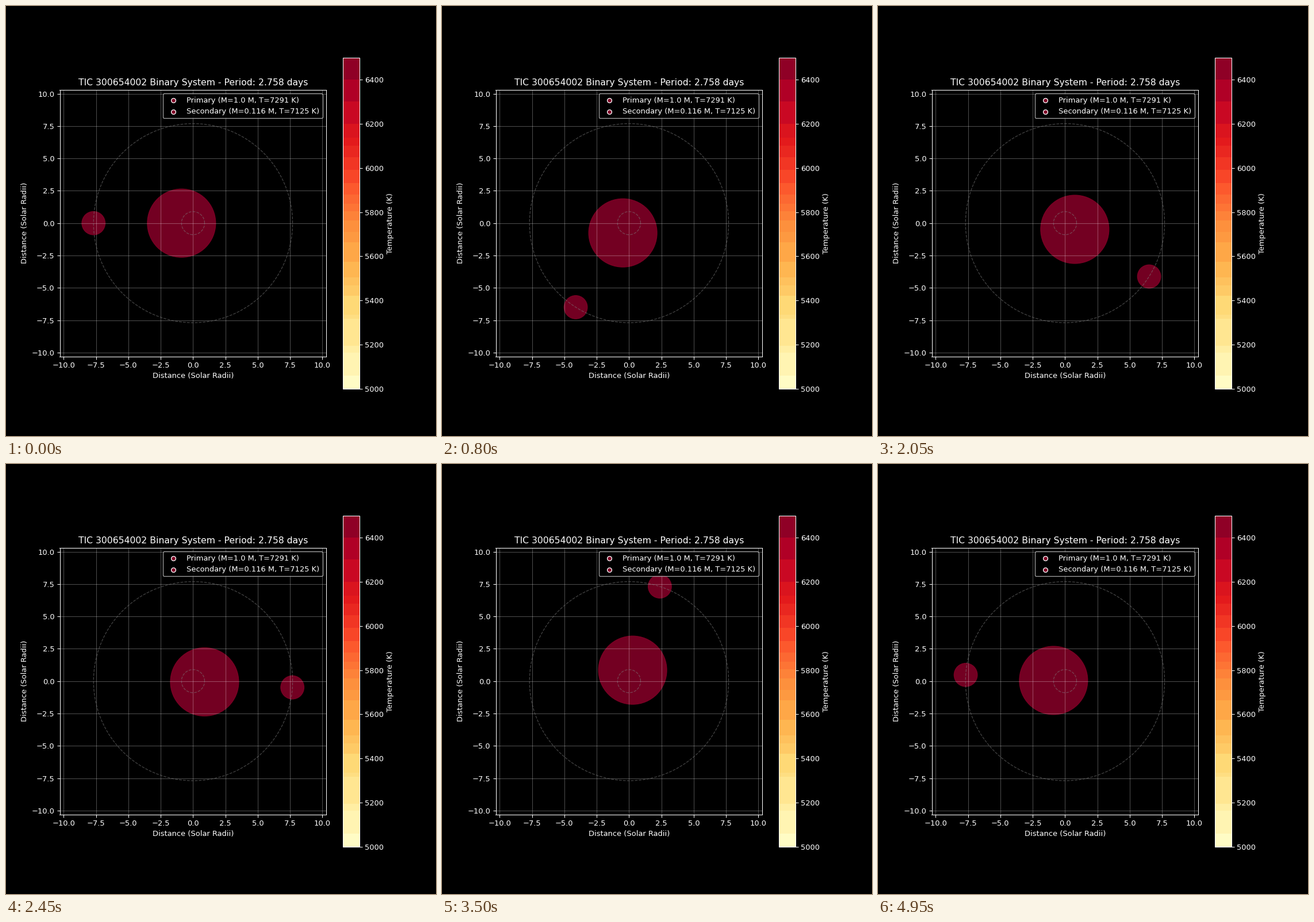
Animation, 748 px wide and 748 px high, one loop 5000 ms. Source, as a matplotlib script:

```python
import numpy as np
import matplotlib.pyplot as plt
from matplotlib.animation import FuncAnimation
from matplotlib.cm import ScalarMappable
from matplotlib.colors import ListedColormap, Normalize
from matplotlib.patches import Circle

plt.style.use("dark_background")
plt.rcParams["font.family"] = "DejaVu Sans"

FRAMES = 100
PERIOD = 2.758                # days
M1, M2 = 1.0, 0.116           # solar masses
R1, R2 = 2.64, 0.9            # solar radii
T1, T2 = 7291, 7125           # kelvin

# Kepler's third law, converted from AU to solar radii
sep = ((M1 + M2) * (PERIOD / 365.25) ** 2) ** (1 / 3) * 215.03
A1 = sep * M2 / (M1 + M2)
A2 = sep * M1 / (M1 + M2)

# Stepped temperature scale: each band takes the colour at its middle
ylorrd = plt.get_cmap("YlOrRd")
edges = [0, 10, 28, 33, 54, 57, 72, 80, 86, 98, 113, 121, 130, 137, 143,
         150, 159, 169, 179, 188, 194, 205, 222, 239, 256]
bands = [ylorrd((lo + hi) // 2)
         for lo, hi in zip(edges, edges[1:]) for _ in range(lo, hi)]
scale = ScalarMappable(Normalize(5000, 6500), ListedColormap(bands))
star_color = ylorrd(1.0)

fig, ax = plt.subplots(figsize=(8, 8), dpi=93.5)
lim = 1.2 * sep
ax.set_xlim(-lim, lim)
ax.set_ylim(-lim, lim)
ax.set_aspect("equal")
ax.grid(True, color="white", alpha=0.3)
ax.set_xlabel("Distance (Solar Radii)")
ax.set_ylabel("Distance (Solar Radii)")
ax.set_title(f"TIC 300654002 Binary System - Period: {PERIOD} days")
fig.colorbar(scale, ax=ax, label="Temperature (K)")

theta = np.linspace(0, 2 * np.pi, 200)
for a in (A1, A2):
    ax.plot(a * np.cos(theta), a * np.sin(theta), "--", color="gray",
            alpha=0.5, lw=1)


def add_star(radius, a):
    return ax.add_patch(Circle((-a, 0), radius, color=star_color, alpha=0.9))


stars = [(add_star(R1, A1), A1), (add_star(R2, A2), A2)]

for name, m, t in (("Primary", M1, T1), ("Secondary", M2, T2)):
    ax.scatter([], [], color=star_color, edgecolor="white", lw=1,
               label=f"{name} (M={m} M, T={t} K)")
ax.legend(loc="upper right")


def update(i):
    phase = np.pi + 2 * np.pi * i / FRAMES
    for star, a in stars:
        star.center = (a * np.cos(phase), a * np.sin(phase))
    return [star for star, _ in stars]


anim = FuncAnimation(fig, update, frames=FRAMES, interval=50, repeat=True)
plt.show()
```
